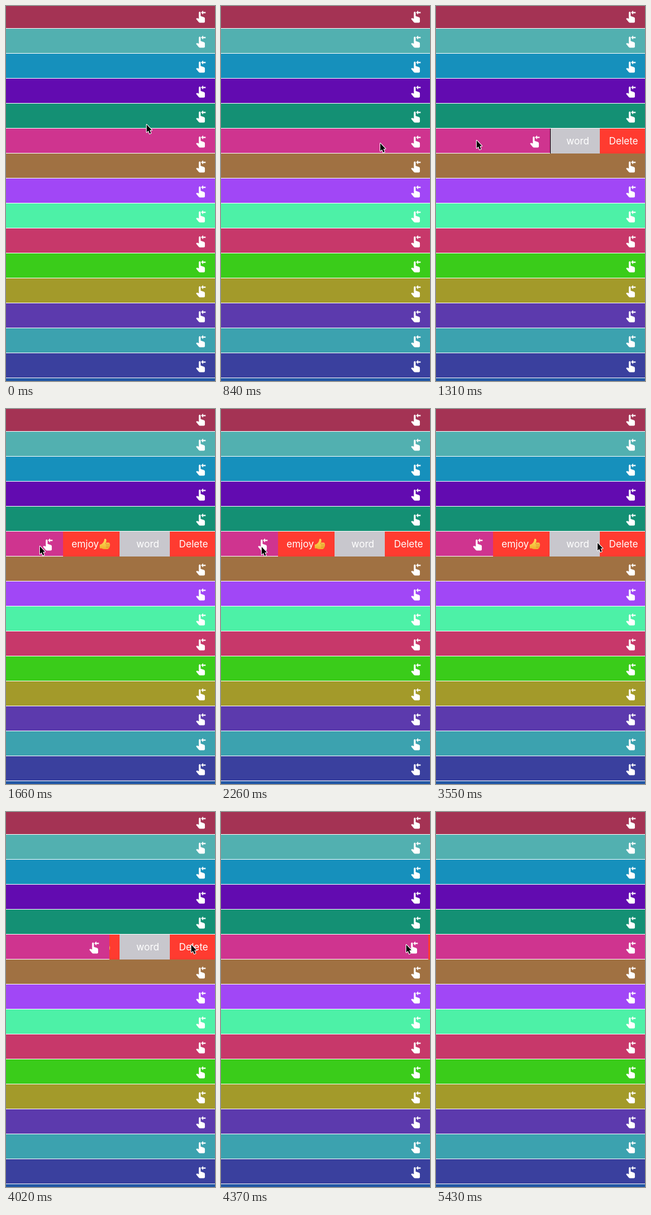
These frames come from a looping animation (370x661 px, 5.67 s). An HTML page:

```html
<!DOCTYPE html>
<html lang="en">
<head>
<meta charset="utf-8">
<title>Swipe to delete</title>
<style>
  html, body { margin: 0; width: 370px; height: 661px; overflow: hidden; background: #fff; }
  svg { display: block; }
  text { font: 400 17px Inter, "Liberation Sans", sans-serif; fill: #fff; }
</style>
</head>
<body>
<svg width="370" height="661" viewBox="0 0 370 661">
  <defs>
    <linearGradient id="skin" x1="0" y1="0" x2="0" y2="1">
      <stop offset="0" stop-color="#ffe05c"/>
      <stop offset="1" stop-color="#f2ae2e"/>
    </linearGradient>
    <g id="hand" fill="#fff">
      <path d="M5.4 3.6a1.6 1.6 0 0 1 3.2 0V9.8L14.6 11.8Q16.2 12.5 16.1 14.2V19.6Q16 21.5 14.2 21.5H7.4Q6.3 21.5 5.5 20.7L.5 14.8L1.4 13.7Q2.2 13.1 3.2 13.5L5.4 14.6Z"/>
      <path d="M9.3 3.6L13 0V2.4H17.4V4.8H13V7.2Z"/>
    </g>
  </defs>
  <g id="list"></g>
  <g id="actions">
    <rect x="101" y="216" width="100" height="44" fill="#ff3b30"/>
    <rect x="201" y="216" width="89" height="44" fill="#c8c7cd"/>
    <rect x="290" y="216" width="80" height="44" fill="#ff3b30"/>
    <text x="116" y="244">emjoy</text>
    <text x="251" y="244" text-anchor="middle">word</text>
    <text x="332" y="244" text-anchor="middle">Delete</text>
    <g transform="translate(165 228.5) scale(.93)">
      <path fill="url(#skin)" d="M1 11.5Q5 11 7.5 7.5Q9.6 4.6 9.8 1.6Q10.2 0 11.8.3Q14 1 13.6 4.4L12.8 7.6H18.4Q20.4 8 20 10Q21.4 11.4 20.2 13Q21 14.8 19.4 15.9Q19.8 18 17.8 18.6Q17.4 20 15.4 20H9.6Q7 20 5 18.6L1 18.2Z"/>
      <path fill="none" stroke="#c9822a" stroke-width=".8" d="M12.8 7.8Q11.6 9.4 13 10.6H19.6M13 13.6H19.6M13 16.4H19"/>
    </g>
  </g>
  <g id="open">
    <rect y="216" width="370" height="43" fill="#cf348f"/>
    <rect y="259" width="370" height="1" fill="#fff"/>
    <use id="openHand" href="#hand" y="228"/>
    <rect id="gap" x="370" y="216" width="1" height="44"/>
  </g>
  <path id="cursor" stroke="#fff" stroke-width="2" paint-order="stroke" stroke-linejoin="round"
    d="M2 1V14.5L5 11.7L7.2 17.1L9.6 16.1L7.4 10.8H11.2Z"/>
</svg>
<script>
const LOOP = 5670, FRAMES = 48, WIDTH = 370, OPEN_EDGE = 101, ROW = 44;
const colors = [
  "#a43354", "#52b0b0", "#1690bc", "#620bb0", "#149074", "#cf348f", "#a07142", "#a147f6",
  "#4df1a7", "#c7386a", "#3acc1a", "#a39a2a", "#5c3aad", "#3ca2af", "#3a409e", "#2257a5"
];

// Key points of the pointer's path: frame, x, y
const path = [
  [0, 247, 208], [1, 251, 229], [2, 251, 229], [6, 281, 242], [7, 280, 241],
  [11, 70, 236], [13, 57, 241], [17, 62, 242], [19, 70, 242], [22, 91, 242],
  [27, 158, 241], [31, 326, 233], [37, 326, 233], [38, 312, 304], [43, 341, 569], [46, 347, 700]
];

const byId = id => document.getElementById(id);
const move = (id, x, y) => byId(id).setAttribute("transform", `translate(${x} ${y})`);
const show = (id, on) => { byId(id).style.display = on ? "" : "none"; };
const mix = (a, b, p) => Math.round(a + (b - a) * p);
const progress = (frame, start, length) => Math.min(1, Math.max(0, (frame - start) / length));
const easeInOut = p => p * p * (3 - 2 * p);
const easeOut = p => Math.sin(p * Math.PI / 2);

function pointerAt(frame) {
  const next = path.findIndex(point => point[0] > frame);
  if (next < 0) return path.at(-1).slice(1);
  const [f0, x0, y0] = path[next - 1];
  const [f1, x1, y1] = path[next];
  const p = (frame - f0) / (f1 - f0);
  return [mix(x0, x1, p), mix(y0, y1, p)];
}

function edgeAt(frame) {
  const opened = easeInOut(progress(frame, 7, 6.85));
  const closed = easeOut(progress(frame, 33.16, 4.24));
  return mix(WIDTH, OPEN_EDGE, opened - closed);
}

byId("list").innerHTML = colors.map((color, i) => {
  const y = i * ROW - 4;
  return `<rect y="${y}" width="${WIDTH}" height="${ROW - 1}" fill="${color}"/>
    <use href="#hand" x="336" y="${y + 12}"/>`;
}).join("");

function draw(now) {
  // The small lead absorbs rounding of the frame length.
  const frame = Math.floor((now % LOOP) / LOOP * FRAMES + 0.15);
  const edge = edgeAt(frame);
  const isOpen = edge < WIDTH;
  const dragging = isOpen && frame < 12;

  move("cursor", ...pointerAt(frame));
  move("open", edge - WIDTH, 0);
  byId("openHand").setAttribute("x", WIDTH - (isOpen ? 36 : 34));
  show("actions", isOpen);
  show("gap", dragging);
}

const start = performance.now();
function tick() {
  draw(performance.now() - start);
  requestAnimationFrame(tick);
}
tick();
</script>
</body>
</html>
```
